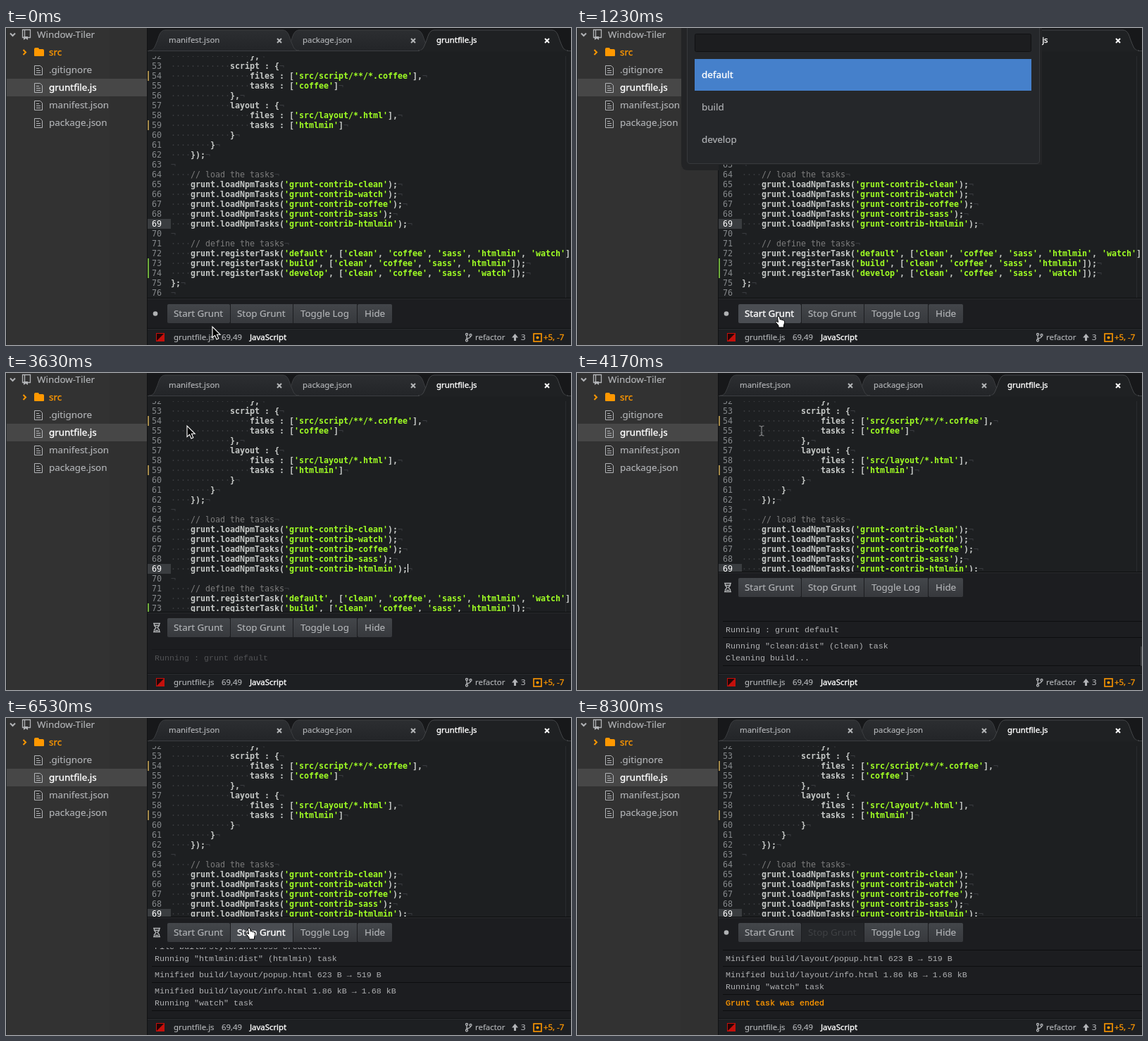
Recreate the animation shown at these times as an HTML page. Size 802x450 px, loop 8390 ms.

```html
<!DOCTYPE html>
<html lang="en">
<head>
<meta charset="utf-8">
<title>Task runner panel</title>
<style>
  html, body { margin: 0; width: 100%; height: 100%; overflow: hidden; background: #1d1f21; }
  svg { display: block; width: 802px; height: 450px; }
  text { white-space: pre; }
  .ui { font: 13.4px "Noto Sans", "Open Sans", sans-serif; fill: #b2b4b7; stroke: #b2b4b7; stroke-width: .15px; }
  .small { font: 11.4px "Noto Sans", "Open Sans", sans-serif; fill: #b2b4b7; stroke: #b2b4b7; stroke-width: .15px; }
  .code { font: bold 11.63px "DejaVu Sans Mono", monospace; fill: #c5c8c6; }
  .string { fill: #a0ff24; }
  .comment { fill: #7c7c7c; font-weight: normal; }
  .faint { fill: #3b3d40; font-weight: normal; }
  .number { fill: #85888b; font-weight: normal; }
  .log { font: 11.667px "Liberation Mono", "Courier New", monospace; fill: #b0b1b3; }
  .bright { fill: #fff; stroke: #fff; stroke-width: .35px; }
  .orange { fill: #ff9800; }
  text.orange { stroke: #ff9800; stroke-width: .3px; }
  .button rect { fill: url(#face); }
  .button.hover rect { fill: #4a4d52; }
  .button.hover text { fill: #fff; stroke: #fff; stroke-width: .35px; }
  .button.off rect { fill: #25272a; }
  .button.off text { fill: #3f4144; stroke: none; }
</style>
</head>
<body>
<svg viewBox="0 0 802 450">
  <defs>
    <linearGradient id="face" x2="0" y2="1">
      <stop stop-color="#43464a"/><stop offset="1" stop-color="#37393d"/>
    </linearGradient>
    <linearGradient id="tabFace" x2="0" y2="1">
      <stop stop-color="#2c2e31"/><stop offset="1" stop-color="#232528"/>
    </linearGradient>
    <path id="tab" d="M0 32C7 32 8 27 11 20S15 3 23 3H190C198 3 199 13 202 20S206 32 213 32"/>
    <path id="cross" d="M-3-3L3 3M3-3L-3 3" stroke-width="2"/>
    <g id="file" fill="none" stroke="#b2b4b7">
      <path d="M-5.5-6.5H2.5L5.5-3.5V6.5H-5.5Z"/><path d="M-3-2.5H1M-3 .5H3M-3 3.5H3"/>
    </g>
    <clipPath id="logClip"><rect id="logWindow" x="201" width="601"/></clipPath>
  </defs>

  <rect width="802" height="450" fill="#1d1f21"/>
  <rect x="794" y="40" width="1" height="344" fill="#2a2c2f"/>
  <g id="editor"></g>

  <g id="tabs">
    <rect x="201" width="601" height="33" fill="#17181a"/>
    <use href="#tab" x="393" fill="url(#tabFace)" stroke="#3c3e41"/>
    <use href="#tab" x="203" fill="url(#tabFace)" stroke="#3c3e41"/>
    <path d="M201 32.5H802" stroke="#3c3e41"/>
    <use href="#tab" x="585" fill="#1f2123" stroke="#45474a"/>
    <rect x="201" y="33" width="601" height="7" fill="#1d1f21"/>
    <path d="M587 32.5H796" stroke="#1f2123" stroke-width="2"/>
    <text class="small" x="231" y="21">manifest.json</text>
    <text class="small" x="421" y="21">package.json</text>
    <text class="small bright" x="611" y="21">gruntfile.js</text>
    <use href="#cross" x="388" y="18" stroke="#b5b7b9"/>
    <use href="#cross" x="578" y="18" stroke="#b5b7b9"/>
    <use href="#cross" x="768" y="18" stroke="#fff"/>
  </g>

  <g id="sidebar">
    <rect width="200" height="450" fill="#323232"/>
    <rect x="147" width="53" height="450" fill="#303030"/>
    <rect width="1" height="450" fill="#22262b"/>
    <rect x="200" width="1" height="450" fill="#111214"/>
    <rect x="1" y="72" width="199" height="25" fill="#474747"/>
    <path d="M6 7.5L9.5 11L13 7.5" fill="none" stroke="#b2b4b7" stroke-width="2"/>
    <path d="M23.5 2.5H34.5V13.5H23.5ZM26.5 2.5V13.5" fill="none" stroke="#b2b4b7" stroke-width="1.3"/>
    <path d="M25 12H31V17L28 15L25 17Z" fill="#b2b4b7"/>
    <text class="ui" x="44" y="14">Window-Tiler</text>
    <path d="M24.5 31L28 34.5L24.5 38" fill="none" stroke="#ff9800" stroke-width="2"/>
    <path class="orange" d="M40 30Q40 28 42 28H45Q47 28 47 30H52Q54 30 54 32V39Q54 40 53 40H41Q40 40 40 39Z"/>
    <text class="ui orange" x="61" y="39">src</text>
    <use href="#file" x="46" y="60"/><text class="ui" x="61" y="64">.gitignore</text>
    <use href="#file" x="46" y="85"/><text class="ui bright" x="61" y="89">gruntfile.js</text>
    <use href="#file" x="46" y="110"/><text class="ui" x="61" y="114">manifest.json</text>
    <use href="#file" x="46" y="135"/><text class="ui" x="61" y="139">package.json</text>
  </g>

  <g id="dock">
    <rect x="201" y="384" width="601" height="160" fill="#1c1d20"/>
    <path d="M201 383.5H802" stroke="#0d0e0f"/><path d="M201 384.5H802" stroke="#2a2c2f"/>
    <circle id="idle" cx="212" cy="405.5" r="3.3" fill="#b0b2b4"/>
    <g id="busy" fill="none" stroke="#b0b2b4" stroke-width="1.4">
      <path d="M209 399.5H219M209 411.5H219M210.5 400V402.5L213 405.5L210.5 408.5V411M217.5 400V402.5L215 405.5L217.5 408.5V411"/>
      <path d="M211 402.5H217M212 409.5H216"/>
    </g>
    <g class="button" id="start"><rect x="229" y="392" width="89" height="27" rx="2"/><text class="ui" x="238" y="410">Start Grunt</text></g>
    <g class="button" id="stop"><rect x="319" y="392" width="88" height="27"/><text class="ui" x="328" y="410">Stop Grunt</text></g>
    <g class="button"><rect x="408" y="392" width="90" height="27"/><text class="ui" x="418" y="410">Toggle Log</text></g>
    <g class="button"><rect x="499" y="392" width="49" height="27" rx="2"/><text class="ui" x="509" y="410">Hide</text></g>
  </g>

  <g clip-path="url(#logClip)"><g id="log"></g></g>
  <rect id="thumb" x="800" y="388" width="2" height="28" rx="1" fill="#3e4043"/>

  <g id="status">
    <rect x="201" y="427" width="601" height="23" fill="#1d1f22"/>
    <path d="M201 426.5H802" stroke="#101113"/><path d="M201 427.5H802" stroke="#2a2c2f"/>
    <rect x="213.5" y="433.5" width="11" height="11" fill="#250506" stroke="#c4100c"/>
    <path d="M214 444H224V434Z" fill="#c4100c"/>
    <text class="small" x="238" y="443">gruntfile.js</text>
    <text class="small" x="306" y="443">69,49</text>
    <text class="small bright" x="346" y="443">JavaScript</text>
    <g fill="none" stroke="#b2b4b7" stroke-width="1.3">
      <circle cx="654" cy="435" r="1.5"/><circle cx="654" cy="443.5" r="1.5"/><circle cx="659.5" cy="436" r="1.5"/>
      <path d="M654 436.5V442M659.5 437.5Q659.5 440 654 441"/>
    </g>
    <text class="small" x="666" y="443">refactor</text>
    <path d="M722.5 434L727 439.5H724V444H721V439.5H718Z" fill="#b2b4b7"/>
    <text class="small" x="731" y="443">3</text>
    <rect x="749" y="434" width="11" height="11" fill="none" stroke="#ff9800" stroke-width="1.6"/>
    <circle class="orange" cx="754.5" cy="439.5" r="2"/>
    <text class="small orange" x="763" y="443">+5, -7</text>
  </g>

  <g id="palette">
    <path d="M148 0H660V194H201V202H158Q148 202 148 192Z" fill="#232426"/>
    <path d="M156.5-1V188Q156.5 192.5 161 192.5H652Q656.5 192.5 656.5 188V-1" fill="#25272a" stroke="#37393c"/>
    <rect x="167.5" y="8.5" width="477" height="25" rx="2" fill="#1c1d1f" stroke="#101113"/>
    <rect x="167" y="44" width="478" height="45" fill="#4580cb"/>
    <text class="ui bright" x="177" y="71">default</text>
    <text class="ui" x="177" y="117">build</text>
    <text class="ui" x="177" y="163">develop</text>
    <rect id="inputCaret" x="173" y="10" width="1" height="20" fill="#fff"/>
  </g>

  <g id="pointer">
    <path id="arrow" d="M0 0V15.5L3.6 12.3L6 18L8.8 16.8L6.4 11.3H11.2Z" fill="#000" stroke="#fff" stroke-width="1.1"/>
    <path id="hand" d="M-1.5 1Q0-1 1.5 1L2.3 5Q4 4 5 5.5Q6.5 5 7.3 6.5Q9 6.5 8.8 9L7.5 13V16H0V13.5L-4 8.5Q-4 6.5-2 7.5L-.5 9Z" fill="#fff" stroke="#000"/>
    <path id="beam" d="M-3.5-7Q-.5-7 0-5Q.5-7 3.5-7M0-5.5V5.5M-3.5 7Q-.5 7 0 5Q.5 7 3.5 7M-1.5 3H1.5" fill="none" stroke="#808284" stroke-width="1.2"/>
  </g>
</svg>
<script>
const LOOP = 8390, STEP = LOOP / 95;
const $ = id => document.getElementById(id);

function add(parent, tag, attrs = {}, content) {
  const node = document.createElementNS('http://www.w3.org/2000/svg', tag);
  for (const key in attrs) node.setAttribute(key, attrs[key]);
  if (content !== undefined) node.textContent = content;
  return parent.appendChild(node);
}

const script = `            },
        script : {
            files : ['src/script/**/*.coffee'],
            tasks : ['coffee']
        },
        layout : {
            files : ['src/layout/*.html'],
            tasks : ['htmlmin']
        }
    }
});

// load the tasks
grunt.loadNpmTasks('grunt-contrib-clean');
grunt.loadNpmTasks('grunt-contrib-watch');
grunt.loadNpmTasks('grunt-contrib-coffee');
grunt.loadNpmTasks('grunt-contrib-sass');
grunt.loadNpmTasks('grunt-contrib-htmlmin');

// define the tasks
grunt.registerTask('default', ['clean', 'coffee', 'sass', 'htmlmin', 'watch']);
grunt.registerTask('build', ['clean', 'coffee', 'sass', 'htmlmin']);
grunt.registerTask('develop', ['clean', 'coffee', 'sass', 'watch']);
};
`.split('\n');

const editor = $('editor');
const rowY = line => 54 + (line - 53) * 14;
add(editor, 'rect', { x: 201, y: 271, width: 33, height: 14, fill: '#3a3d40' });
for (const line of [54, 59, 73, 74])
  add(editor, 'rect', { x: 201, y: rowY(line) - 7, width: 2, height: 14, fill: line < 70 ? '#a58a4a' : '#6fae3c' });

script.forEach((raw, i) => {
  const line = 52 + i, y = rowY(line) + 4;
  const nested = raw && line < 75;
  const code = (nested ? '    ' : '') + raw;
  add(editor, 'text', { class: 'code number', x: 207, y, ...(line === 69 && { style: 'fill:#fff' }) }, line);
  const row = add(editor, 'text', { class: 'code', x: 234, y });
  const indent = code.match(/^ */)[0].length;
  add(row, 'tspan', { class: 'faint' }, '·'.repeat(indent));
  for (const part of code.slice(indent).split(/('[^']*'|\/\/ .*)/)) {
    const kind = part[0] === "'" ? 'string' : part.startsWith('// ') ? 'comment' : '';
    if (part) add(row, 'tspan', { class: kind }, part);
  }
  add(row, 'tspan', { class: 'faint' }, '¬');
});
const caret = add(editor, 'rect', { x: 570, y: 271, width: 1, height: 12, fill: '#fff' });

// [time, text, opens a new block]
const output = [
  [3600, 'Running : grunt default', 1],
  [4050, 'Running "clean:dist" (clean) task', 1],
  [4050, 'Cleaning build...', 0],
  [4300, 'Running "coffee:dist" (coffee) task', 1],
  [4300, 'File build/script/popup.js created.', 0],
  [4500, 'Running "sass:dist" (sass) task', 1],
  [4600, 'File build/style/popup.css created.', 0],
  [4700, 'File build/style/info.css created.', 0],
  [4700, 'Running "htmlmin:dist" (htmlmin) task', 0],
  [4780, 'Minified build/layout/popup.html 623 B → 519 B', 1],
  [4780, 'Minified build/layout/info.html 1.86 kB → 1.68 kB', 1],
  [4830, 'Running "watch" task', 0],
  [6580, 'Grunt task was ended', 1]
];
let depth = 0;
const entries = output.map(([time, text, opens]) => {
  depth += opens ? 23 : 17;
  const node = add($('log'), 'g');
  if (opens) add(node, 'path', { d: `M207 ${depth - 11.5}H802`, stroke: '#0d0e0f' });
  add(node, 'text', { class: 'log' + (time > 6000 ? ' orange' : ''), x: 211, y: depth + 4 }, text);
  return { time, depth, node };
});
const lastRule = add($('log'), 'path', { d: 'M207 11.5H802', stroke: '#0d0e0f' });

const path = [
  [80, 293, 424], [600, 286, 409], [1690, 286, 409], [2120, 254, 100], [2370, 254, 92],
  [2900, 257, 75], [3700, 257, 75], [4080, 262, 82], [4500, 262, 82], [4800, 265, 86],
  [4900, 265, 86], [5290, 325, 206], [5900, 345, 298], [7170, 345, 298], [7690, 680, 426],
  [7890, 680, 426], [8040, 720, 452]
];

function pointerAt(t) {
  const i = path.findIndex(p => p[0] > t);
  if (i < 1) return path.at(i).slice(1);
  const [t0, x0, y0] = path[i - 1], [t1, x1, y1] = path[i];
  const u = (t - t0) / (t1 - t0), k = u * u * (3 - 2 * u);
  return [x0 + (x1 - x0) * k, y0 + (y1 - y0) * k];
}

const within = (t, ...spans) => spans.some(([from, to]) => t >= from && t < to);
const show = (node, on) => { node.style.display = on ? '' : 'none'; };

function draw(t) {
  const rise = t < 3600 ? 0 : t < 4050 ? 44 : 101;
  $('dock').setAttribute('transform', `translate(0 ${-rise})`);
  $('logWindow').setAttribute('y', 427 - rise);
  $('logWindow').setAttribute('height', rise);

  const running = within(t, [3600, 6580]);
  show($('busy'), running);
  show($('idle'), !running);
  $('start').classList.toggle('hover', within(t, [200, 1740]));
  $('stop').classList.toggle('hover', within(t, [5780, 6580]));
  $('stop').classList.toggle('off', t >= 6580);

  let bottom = 0;
  for (const entry of entries) {
    show(entry.node, t >= entry.time);
    if (t >= entry.time) bottom = entry.depth;
  }
  $('log').setAttribute('transform', `translate(0 ${404 - bottom})`);
  lastRule.setAttribute('transform', `translate(0 ${bottom})`);
  show(lastRule, t >= 4050);
  entries[0].node.setAttribute('opacity', t < 3690 ? .35 : 1);
  show($('thumb'), within(t, [4050, 5500], [6580, 7350]));

  show($('palette'), within(t, [1200, 3590]));
  show($('inputCaret'), within(t, [1300, 1740], [2350, 2800], [3250, 3600]));
  show(caret, within(t, [160, 500], [3600, 4050], [4480, 4900], [5270, 5680], [6060, 6430]));

  const hand = within(t, [300, 1740], [5780, 7230]), beam = within(t, [4050, 5780]);
  show($('hand'), hand);
  show($('beam'), beam);
  show($('arrow'), !hand && !beam);
  show($('pointer'), t < 8030);
  $('pointer').setAttribute('transform', `translate(${pointerAt(t).map(Math.round)})`);
}

const origin = performance.now();
function tick() {
  const t = (performance.now() - origin) % LOOP;
  draw(Math.min(94, Math.floor((t + 15) / STEP)) * STEP);
  requestAnimationFrame(tick);
}
tick();
</script>
</body>
</html>
```
